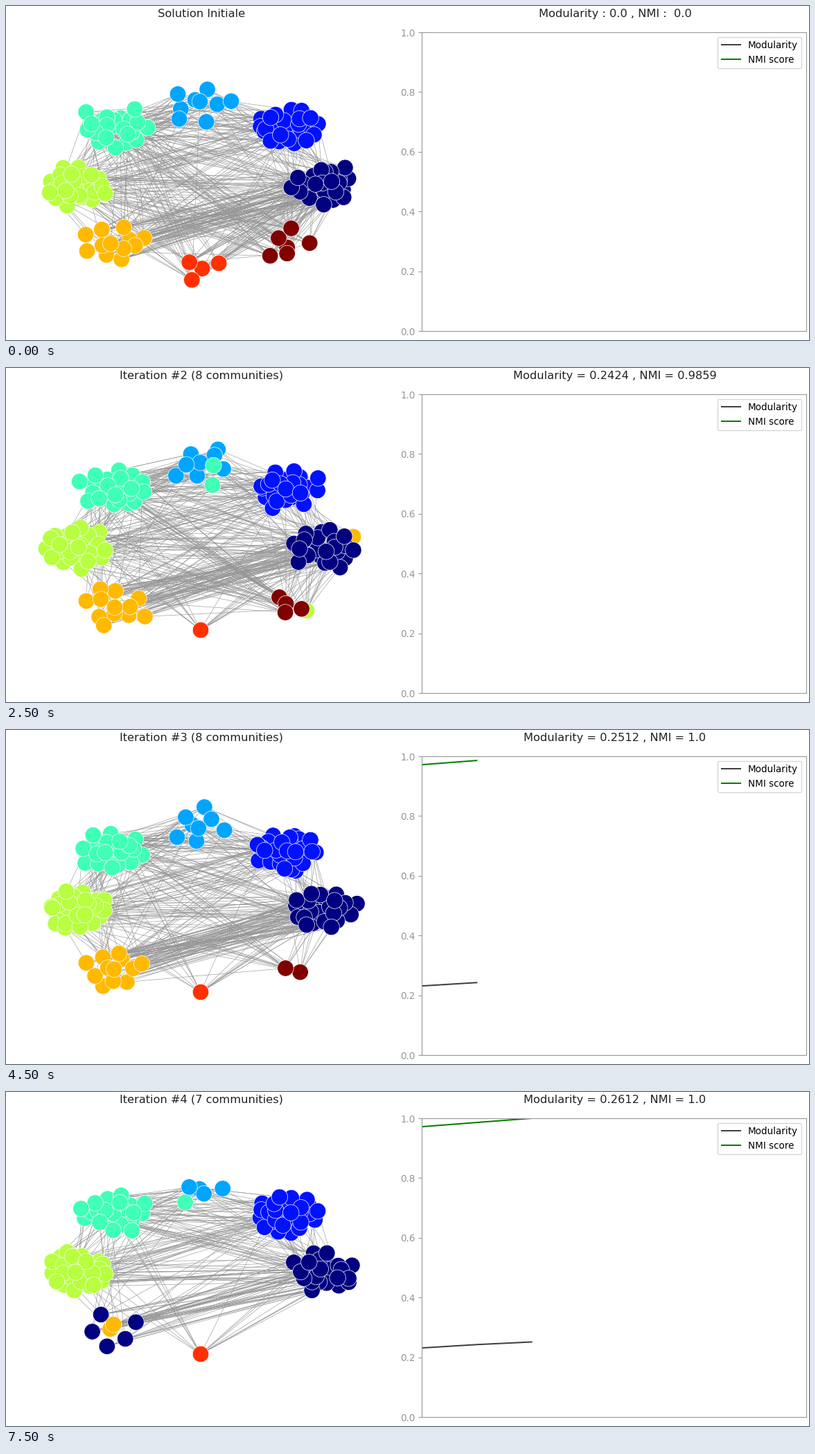
A matplotlib script for the animation above (8000 ms loop, 1159 by 483 pixels).

```python
from itertools import combinations_with_replacement

import numpy as np
import matplotlib.pyplot as plt
from matplotlib.animation import FuncAnimation
from matplotlib.collections import LineCollection

W, H, DPI = 1159, 483, 100
K = 0.975  # overall scale of type and strokes
GROUPS = "NBCTLORM"  # navy, blue, cyan, teal, lime, orange, red, maroon
COLOURS = dict(zip(GROUPS, plt.get_cmap("jet")(np.linspace(0, 1, 8))))

# The groups sit on an ellipse, each one spread over a smaller ellipse
ANGLES = np.arange(8) * np.pi / 4
CENTRES = dict(zip(GROUPS, np.column_stack(
    [281 + 178 * np.cos(ANGLES), 260 - 119 * np.sin(ANGLES)])))
SPREAD = np.array([46, 28])

# Group sizes of the successive layouts, in the order of GROUPS
SIZES = [
    [25, 27, 9, 24, 26, 12, 4, 6],
    [25, 27, 9, 24, 28, 12, 1, 5],
    [25, 28, 8, 24, 28, 12, 1, 2],
    [26, 28, 5, 25, 28, 7, 1, 0],
]

# Chance of a link between two nodes, and how much likelier some pairs are
LINK_CHANCE = 0.03
AFFINITY = {"NO": 9, "CT": 6, "NR": 10, "TR": 5, "LR": 3, "BC": 3,
            "NM": 6, "TM": 6, "LM": 4, "CC": 4}


def spiral(n, phase):
    """Even scatter of n points over a disc; small groups stay tighter."""
    k = np.arange(n)
    radius = np.sqrt(k / max(n - 1, 1)) * min(1, np.sqrt(n / 9))
    angle = 2.4 * k + phase
    return radius[:, None] * np.column_stack([np.cos(angle), np.sin(angle)])


def build(layout, moves):
    """Return node positions, colours and links of one state.

    A move such as "CTC" names the group a node leaves, the group it joins
    and the colour it takes.
    """
    rng = np.random.default_rng(layout + 5)
    places, tints, depths = {}, {}, {}
    for g, n in zip(GROUPS, SIZES[layout]):
        jitter = rng.normal(0, 3, (n, 2)) * (n > 1)
        places[g] = CENTRES[g] + SPREAD * spiral(n, rng.uniform(0, 6)) + jitter
        tints[g] = [g] * n
        depths[g] = rng.random(n)

    used = dict.fromkeys(GROUPS, 0)
    for j, (src, dst, tint) in enumerate(moves):
        used[src] += 1
        i = -used[src]
        tints[src][i] = tint
        if src != dst:
            offset = np.array([np.cos(2.4 * j), np.sin(2.4 * j)])
            places[src][i] = CENTRES[dst] + 0.4 * SPREAD * offset

    links = []
    for a, b in combinations_with_replacement(GROUPS, 2):
        na, nb = len(places[a]), len(places[b])
        count = round(LINK_CHANCE * AFFINITY.get(a + b, 1) * na * nb)
        ends = zip(rng.integers(0, max(na, 1), count),
                   rng.integers(0, max(nb, 1), count))
        links += [(places[a][i], places[b][j]) for i, j in ends]

    order = np.argsort(np.concatenate([depths[g] for g in GROUPS]))
    points = np.concatenate([places[g] for g in GROUPS])[order]
    colours = np.array([COLOURS[t] for g in GROUPS for t in tints[g]])[order]
    return points, colours, links


def iteration(n, communities):
    return f"Iteration #{n} ({communities} communities)"


def scores(n):
    return f"Modularity = {MODULARITY[n - 1]} , NMI = {NMI[n - 1]}"


MODULARITY = [0.2312, 0.2424, 0.2512, 0.2612]
NMI = [0.9718, 0.9859, 1.0, 1.0]

# Layout, moves, communities
STATES = [
    (0, "", 8),
    (0, "TRT RMR MOM CTC RBR", 8),
    (1, "", 8),
    (1, "TCT NNO CCT MML", 8),
    (1, "TCT NNO CCT MML CTC MMT MMT", 8),
    (2, "", 8),
    (2, "CCT CCT CTC CMT MMR MOO OON OON OON RRB", 7),
    (3, "ORO BCB", 7),
    (3, "CCT OON OON OON OON OON", 7),
]
GRAPHS = [build(layout, moves.split()) for layout, moves, _ in STATES]

plt.rcParams["font.family"] = "DejaVu Sans"
fig = plt.figure(figsize=(W / DPI, H / DPI), dpi=DPI, facecolor="white")

net = fig.add_axes([0, 0, 1, 1])
net.set(xlim=(0, W), ylim=(H, 0))
net.axis("off")
lines = LineCollection([], colors="#969696", linewidths=0.45 * K, zorder=1)
net.add_collection(lines)
dots = net.scatter([], [], s=300 * K**2, edgecolors="white",
                   linewidths=0.5 * K, zorder=2)
title_style = dict(ha="center", va="baseline", fontsize=12 * K, color="#222222")
left_title = net.text(282, 16, "", **title_style)
right_title = net.text(879, 16, "", **title_style)

GREY = "#969696"
plot = fig.add_axes([600 / W, 13 / H, 555 / W, 432 / H])
plot.set(xlim=(0, 7), ylim=(0, 1), xticks=[], yticks=np.linspace(0, 1, 6))
plot.tick_params(axis="y", color=GREY, labelcolor=GREY, labelsize=10 * K,
                 length=3.5 * K, width=0.8 * K, pad=3.5 * K)
for spine in plot.spines.values():
    spine.set(color=GREY, linewidth=0.8 * K)
mod_line, = plot.plot([], [], color="#404040", lw=1.5 * K, label="Modularity")
nmi_line, = plot.plot([], [], color="green", lw=1.5 * K, label="NMI score")
plot.legend(loc="upper right", fontsize=10 * K)


def update(i):
    # Each state lasts two ticks; the first and last are cut to one
    state = (i + 1) // 2
    points, colours, links = GRAPHS[state]
    lines.set_segments(links)
    dots.set_offsets(points)
    dots.set_facecolor(colours)

    layout, _, communities = STATES[state]
    if state == 0:
        left_title.set_text("Solution Initiale")
        right_title.set_text("Modularity : 0.0 , NMI :  0.0")
    else:
        left_title.set_text(iteration(layout + 1, communities))
        right_title.set_text(scores(layout + 1))
    # A single point draws no line yet
    mod_line.set_data(range(layout), MODULARITY[:layout])
    nmi_line.set_data(range(layout), NMI[:layout])
    return lines, dots, left_title, right_title, mod_line, nmi_line


anim = FuncAnimation(fig, update, frames=16, interval=500, repeat=True,
                     repeat_delay=0, blit=False)
plt.show()
```
